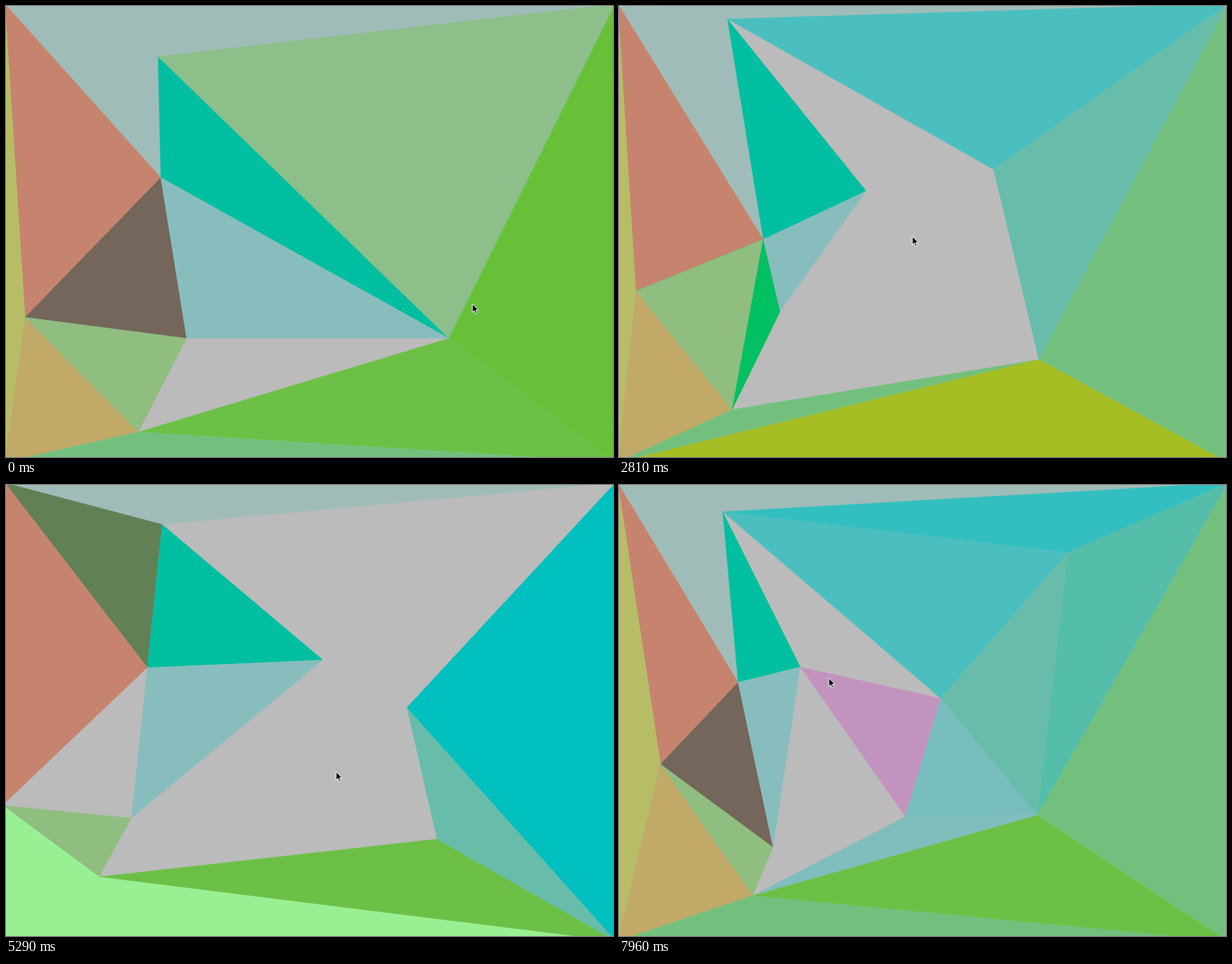
Animation of 868 by 645 pixels, one loop 8000 ms. Source, as an HTML page:

```html
<!DOCTYPE html>
<html lang="en">
<head>
<meta charset="utf-8">
<title>Drifting triangles</title>
<style>
html, body { margin: 0; width: 100%; height: 100%; overflow: hidden; background: #bbb; }
svg { display: block; width: 868px; height: 645px; }
polygon { stroke-width: .3; stroke-linejoin: round; }
</style>
</head>
<body>
<svg viewBox="0 0 868 645">
  <g id="mesh" transform="translate(.3 .3)"></g>
  <path id="cursor" d="M0 0V12.2L2.8 9.6L4.8 14.2L6.8 13.3L4.9 8.9H8.6Z" fill="#000" stroke="#fff"/>
</svg>
<script>
const W = 868, H = 645, LOOP = 8000;

// Steps at which the wandering points pass their key positions.
const KEYS = [0, 12, 19, 25, 30, 36, 45];

// Points added later have shorter paths, which line up with the last keys.
const paths = {
  A: [[217, 72], [155, -1], [163, 43], [196, 82], [223, 56], [197, 18], [148, 38]],
  B: [[221, 245], [267, 311], [159, 332], [176, 230], [202, 261], [232, 306], [170, 282]],
  C: [[27, 445], [43, 406], [5, 414], [-18, 437], [-5, 458], [22, 418], [59, 399]],
  D: [[258, 475], [233, 442], [212, 445], [78, 522], [179, 476], [194, 493], [220, 518]],
  E: [[189, 609], [167, 588], [141, 575], [7, 613], [133, 560], [155, 570], [191, 587]],
  F: [[633, 475], [587, 542], [603, 480], [527, 533], [616, 506], [578, 535], [598, 472]],
  G: [[546, 262], [517, 227], [414, 310], [573, 318], [570, 297], [460, 305]],
  H: [[353, 264], [366, 198], [453, 250], [427, 264], [259, 260]],
  I: [[504, 436], [409, 474]],
  J: [[642, 96]],
  cursor: [[667, 426], [548, 267], [334, 404], [362, 531], [472, 410], [500, 415], [300, 276]]
};

// A face is coloured by its corners, read from left to right where that order is listed.
const palette = {
  '#a0bcb9': 'pAB pAq', '#628055': 'pBA', '#c6846e': 'pBC pAC', '#b7bd66': 'pCs',
  '#c1a968': 'CEs', '#74665a': 'CBD', '#bbbbbb': 'CDB', '#8fbe80': 'CDE BCE',
  '#00bfa1': 'ABF ABG ABH', '#88bdbd': 'BDF BDH BDG BDI', '#8cbf8a': 'AFq',
  '#67c038': 'Fqr', '#73c07e': 'Frq Esr EFs DEs', '#6cc046': 'EFr', '#adbbba': 'ABC',
  '#00bfbf': 'BFG Gqr', '#23bfbd': 'Grq', '#4bbfbf': 'AGq AGJ', '#67bdaa': 'GFr GFq GJF',
  '#a5be24': 'Fsr', '#00c062': 'BDE', '#b98469': 'BHG BHI', '#b2bab8': 'DGF',
  '#99f092': 'CErs', '#c393bf': 'HGI', '#78bdbe': 'GIF', '#80bdbd': 'EIF',
  '#33bfbf': 'AJq', '#54beab': 'JFq'
};

// The left side keeps its faces; each stage lays its own over them.
const LEFT = 'pAq pAB pBC pCs CEs BCD CDE';
const stages = [
  [0, 'ABF BDF AFq Fqr EFr Esr'],
  [12, 'pAC ABC ABG BFG BDF AGq Gqr GFr EFs Fsr'],
  [16, 'BCE BDE BDH ABH AGq GFq Fqr EFs Fsr'],
  [22, 'DEs Fsr ABH BHG BDG DGF GFq Fqr'],
  [28, 'CErs EFr GFr Gqr ABH BDH'],
  [35, 'ABH BHI BDI HGI GIF EIF AGq Gqr GFr EFs Fsr'],
  [41, 'ABH BDH HGI GIF EIF AGJ AJq GJF JFq Fqr Esr EFr']
];

const sorted = face => [...face].sort().join('');
const byOrder = {}, bySet = {};
for (const [color, faces] of Object.entries(palette)) {
  for (const face of faces.split(' ')) {
    byOrder[face] = color;
    bySet[sorted(face)] ??= color;
  }
}

// Smooth curve through the keyed points, held outside its range.
function along(path, k) {
  const keys = KEYS.slice(-path.length);
  const last = path.length - 1;
  if (k <= keys[0]) return path[0];
  if (k >= keys[last]) return path[last];
  const i = keys.findIndex(key => key > k) - 1;
  const span = keys[i + 1] - keys[i];
  const u = (k - keys[i]) / span;
  return [0, 1].map(axis => {
    const slope = j => {
      const a = Math.max(j - 1, 0), b = Math.min(j + 1, last);
      return (path[b][axis] - path[a][axis]) / (keys[b] - keys[a]) * span;
    };
    const from = path[i][axis], to = path[i + 1][axis];
    return from + (to - from) * u * u * (3 - 2 * u)
      + slope(i) * u * (1 - u) ** 2 - slope(i + 1) * u * u * (1 - u);
  });
}

// Corners sit just off stage; the right side sways a little.
function pointsAt(k) {
  const left = -2, right = W + 3, top = -3.5, bottom = H + 7;
  const sway = Math.cos(k * Math.PI / 15);
  const points = {
    p: [left, top], q: [right, top], r: [right + sway, bottom], s: [left, bottom]
  };
  for (const name in paths) points[name] = along(paths[name], k);
  return points;
}

function colorOf(face, points) {
  const order = [...face].sort((a, b) => points[a][0] - points[b][0]).join('');
  return byOrder[order] || bySet[sorted(face)];
}

// The picture advances in discrete steps.
function stepAt(t) {
  if (t < 150) return 0;
  if (t < 3318) return 1 + Math.floor((t - 150) / 176);
  return 19 + Math.max(0, Math.floor((t - 3320) / 178.4));
}

const mesh = document.getElementById('mesh');
const cursor = document.getElementById('cursor');

function draw(k) {
  const points = pointsAt(k);
  const own = stages.filter(([start]) => start <= k).pop()[1];
  mesh.innerHTML = `${LEFT} ${own}`.split(' ').map(face => {
    const color = colorOf(face, points);
    const outline = [...face].map(name => points[name]).join(' ');
    return `<polygon points="${outline}" fill="${color}" stroke="${color}"/>`;
  }).join('');
  cursor.setAttribute('transform', `translate(${points.cursor})`);
}

const began = performance.now();
let shown = -1;
function tick() {
  const k = stepAt((performance.now() - began) % LOOP);
  if (k !== shown) draw(shown = k);
  requestAnimationFrame(tick);
}
tick();
</script>
</body>
</html>
```
